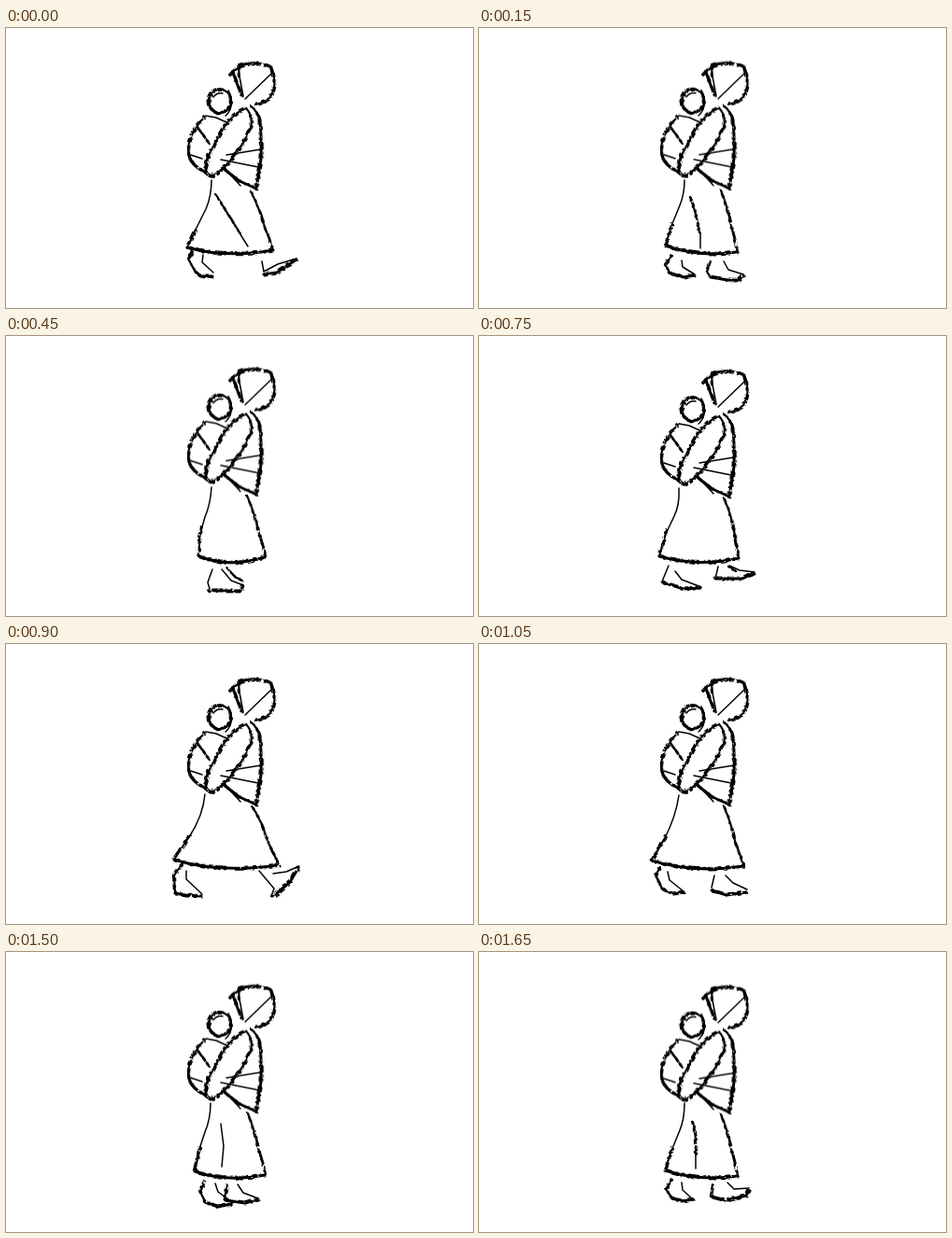
Recreate the animation shown at these times as an HTML page without scripts. Size 500 by 300 pixels, loop 1800 ms.

```html
<!DOCTYPE html>
<html lang="en">
<head>
<meta charset="utf-8">
<title>Walking figure</title>
<style>
  html, body { margin: 0; width: 100%; height: 100%; overflow: hidden; background: #fff; }
  svg { display: block; width: 100%; height: 100%; }
  path { fill: none; stroke: #000; stroke-linecap: round; stroke-linejoin: round; }
  .thin { stroke-width: 1.5; }
  .mid { stroke-width: 2.2; }
  .bold { stroke-width: 3; }
  .mid, .bold { filter: url(#dry-brush); }

  .body { animation: bob 1.8s step-end infinite; }
  @keyframes bob {
    0% { transform: none; }
    8.3333% { transform: translateY(-.3px); }
    16.6667% { transform: translateY(-1px); }
    25% { transform: translateY(-2.4px); }
    33.3333% { transform: translateY(-1.6px); }
    41.6667%, 50%, 58.3333% { transform: none; }
    66.6667% { transform: translateY(-1.3px); }
    75% { transform: translateY(-2px); }
    83.3333% { transform: translateY(-1.2px); }
    91.6667%, 100% { transform: translateY(-.4px); }
  }

  .pose { visibility: hidden; animation: pose 1.8s calc((var(--step) - 12) * 150ms) step-end infinite; }
  @keyframes pose {
    0% { visibility: visible; }
    8.3333%, 100% { visibility: hidden; }
  }
</style>
</head>
<body>
<svg viewBox="0 0 500 300" role="img" aria-label="Woman walking with a baby on her back">
  <!-- a nearly solid stroke with broken bristle marks on both sides -->
  <filter id="dry-brush" filterUnits="userSpaceOnUse" x="0" y="0" width="500" height="300" color-interpolation-filters="sRGB">
    <feTurbulence type="fractalNoise" baseFrequency=".22" numOctaves="2" seed="7" result="noise"/>
    <feColorMatrix in="noise" values="0 0 0 0 0  0 0 0 0 0  0 0 0 0 0  0 0 12 0 -5.8" result="bristles"/>
    <feColorMatrix in="noise" values="0 0 0 0 0  0 0 0 0 0  0 0 0 0 0  0 12 0 0 -3.4" result="flecks"/>
    <feOffset in="SourceGraphic" dx="-1.2" dy="-.8" result="before"/>
    <feOffset in="SourceGraphic" dx="1.2" dy=".8" result="after"/>
    <feMerge result="sides"><feMergeNode in="before"/><feMergeNode in="after"/></feMerge>
    <feComposite in="sides" in2="bristles" operator="in" result="fringe"/>
    <feComposite in="SourceGraphic" in2="flecks" operator="in" result="core"/>
    <feMerge><feMergeNode in="fringe"/><feMergeNode in="core"/></feMerge>
  </filter>

  <g class="body">
    <!-- head and scarf -->
    <path class="bold" d="M249 41Q266 34 284 42M243 48L252 72"/>
    <path class="mid" d="M240 51L249 42L250 53M285 44Q291 60 283 74Q277 80 267 82"/>
    <path class="thin" d="M284 49L256 76M250 52L254 73M283 43L285 52"/>
    <!-- baby -->
    <path class="mid" d="M229 66C245 66 245 91 229 91C213 91 213 66 229 66"/>
    <path class="bold" d="M219 72Q213 85 226 91"/>
    <path class="thin" d="M222 74Q226 69 232 70M238 67Q243 75 241 84Q239 91 235 94"/>
    <!-- wrap -->
    <path class="mid" d="M213 95C201 107 192 124 196 138M205 106L217 123"/>
    <path class="bold" d="M196 137Q199 147 211 153L218 158"/>
    <path class="thin" d="M214 94L225 96L236 101M198 136L210 140"/>
    <!-- arm -->
    <path class="mid" d="M257 86C236 94 229 115 216 138M221 159C236 150 252 130 262 107Q265 94 257 86"/>
    <path class="bold" d="M217 136Q212 151 215 155Q219 162 227 154"/>
    <!-- vest -->
    <path class="bold" d="M271 95Q274 112 273 140L268 172L250 164L232 150"/>
    <path class="mid" d="M261 83Q269 88 272 100"/>
    <path class="thin" d="M236 136L273 130M230 141L270 149M233 149L251 169"/>
  </g>

  <g class="pose" style="--step:0">
    <path class="thin" d="M220 163Q220 180 214 194L202 218M274 250L276 261L291 253L311 247M211 243L210 251L222 262M249 218L259 234"/>
    <path class="mid" d="M203 216L194 236M262 175Q270 190 276 210L286 238M225 179L240 203L250 219M200 240L195 247L203 262"/>
    <path class="bold" d="M194 235Q235 247 286 238M203 261L208 266L221 266M276 264L290 262L311 248"/>
  </g>
  <g class="pose" style="--step:1">
    <path class="thin" d="M220 163Q220 178 215 190L206 212M237 219L237 236M217 249L218 256L231 264M262 250L267 259L283 264"/>
    <path class="mid" d="M207 210L199 234M259 174Q266 191 270 212L277 240M226 181Q233 199 236 219M207 244L199 253L204 262M248 250L244 261L248 267"/>
    <path class="bold" d="M199 233Q236 246 276 240M203 262L219 267L230 265M248 267L266 270L278 270L283 265"/>
  </g>
  <g class="pose" style="--step:2">
    <path class="thin" d="M220 163Q219 178 214 192L207 215M228 184L232 208L231 234M225 249L227 258L241 267M242 250L248 260L262 267"/>
    <path class="mid" d="M208 212L203 235M259 173Q266 190 270 211L278 238M214 247L208 257L212 267M230 251L227 263L230 270"/>
    <path class="bold" d="M203 235Q238 247 277 238M212 267L226 270L240 268M230 271L260 272L263 268"/>
  </g>
  <g class="pose" style="--step:3">
    <path class="thin" d="M220 162Q219 180 213 194L209 208M221 250L216 264L218 271M231 250L241 262L254 267"/>
    <path class="mid" d="M209 204Q206 219 207 236M258 171Q266 189 270 208L278 236M237 249L245 258L253 262"/>
    <path class="bold" d="M207 236Q239 249 277 237M217 273L251 273L254 268"/>
  </g>
  <g class="pose" style="--step:4">
    <path class="thin" d="M217 162Q216 180 208 198M214 248L211 264M223 250L232 262L246 268M252 248L263 257L275 263"/>
    <path class="mid" d="M208 196Q201 216 200 236M260 173Q268 191 272 211L278 237M241 249L237 262"/>
    <path class="bold" d="M200 236Q237 248 278 238M210 267L230 274L246 270M238 264L260 268L275 264"/>
  </g>
  <g class="pose" style="--step:5">
    <path class="thin" d="M214 163Q215 181 209 193L200 212M203 246L196 263M210 252L217 261L238 269M256 247L253 260M268 246L279 251L295 253"/>
    <path class="mid" d="M201 208L193 236M262 174Q270 190 273 209L278 238M267 247L275 252"/>
    <path class="bold" d="M193 236Q235 248 278 238M197 264L219 271L237 270M253 260L282 260L294 254"/>
  </g>
  <g class="pose" style="--step:6">
    <path class="thin" d="M213 161Q211 184 196 207M193 243L193 252L210 268M271 243L287 262L284 270M286 246L300 244L314 238"/>
    <path class="mid" d="M197 205L180 231M264 175Q274 190 280 211L292 236M188 236L180 248L181 267M284 270L292 269"/>
    <path class="bold" d="M180 231Q227 246 292 237M181 267L192 269L209 270M290 267L304 255L313 240"/>
  </g>
  <g class="pose" style="--step:7">
    <path class="thin" d="M214 162Q211 184 199 208M202 244L204 253L219 265M252 248L249 261M264 248L272 256L287 263"/>
    <path class="mid" d="M200 206L185 232M262 174Q270 191 274 211L284 238M194 239L189 248L196 262"/>
    <path class="bold" d="M185 232Q230 246 283 238M196 262L208 268L219 266M249 264L265 269L286 266"/>
  </g>
  <g class="pose" style="--step:8">
    <path class="thin" d="M214 162Q210 182 201 202M231 250L229 262"/>
    <path class="mid" d="M202 199L191 233M260 173Q267 190 271 210L278 239M209 246L222 254L229 263M243 251L249 262L259 271M231 268L258 270"/>
    <path class="bold" d="M191 233Q233 248 278 239M222 256L229 262M240 269L258 270"/>
  </g>
  <g class="pose" style="--step:9">
    <path class="thin" d="M217 162Q215 181 208 200M222 249L219 264L221 270M236 250L244 260L257 267"/>
    <path class="mid" d="M208 198L201 235M259 172Q266 190 270 209L278 238M227 249L234 257L244 262"/>
    <path class="bold" d="M201 235Q237 248 277 238M221 271L253 272L257 267"/>
  </g>
  <g class="pose" style="--step:10">
    <path class="thin" d="M219 162Q219 179 213 193L207 211M224 248L227 257L241 267M248 249L254 258L270 264M230 184L233 208L231 230"/>
    <path class="mid" d="M208 209L202 235M259 173Q266 190 270 210L278 238M213 246L208 257L213 267M237 250L234 263"/>
    <path class="bold" d="M202 235Q237 247 277 239M213 268L227 273L241 270M235 266L256 269L270 265"/>
  </g>
  <g class="pose" style="--step:11">
    <path class="thin" d="M220 162Q220 179 215 191L206 213M232 214L232 232M217 247L218 255L229 265M266 247L273 254L289 253"/>
    <path class="mid" d="M207 210L199 234M259 174Q266 190 270 211L277 239M229 182Q233 198 232 216M207 244L200 254L207 264M250 249L248 262"/>
    <path class="bold" d="M199 234Q236 246 277 240M206 263L217 267L229 265M249 262L264 266L286 261L289 255"/>
  </g>
</svg>
</body>
</html>
```
